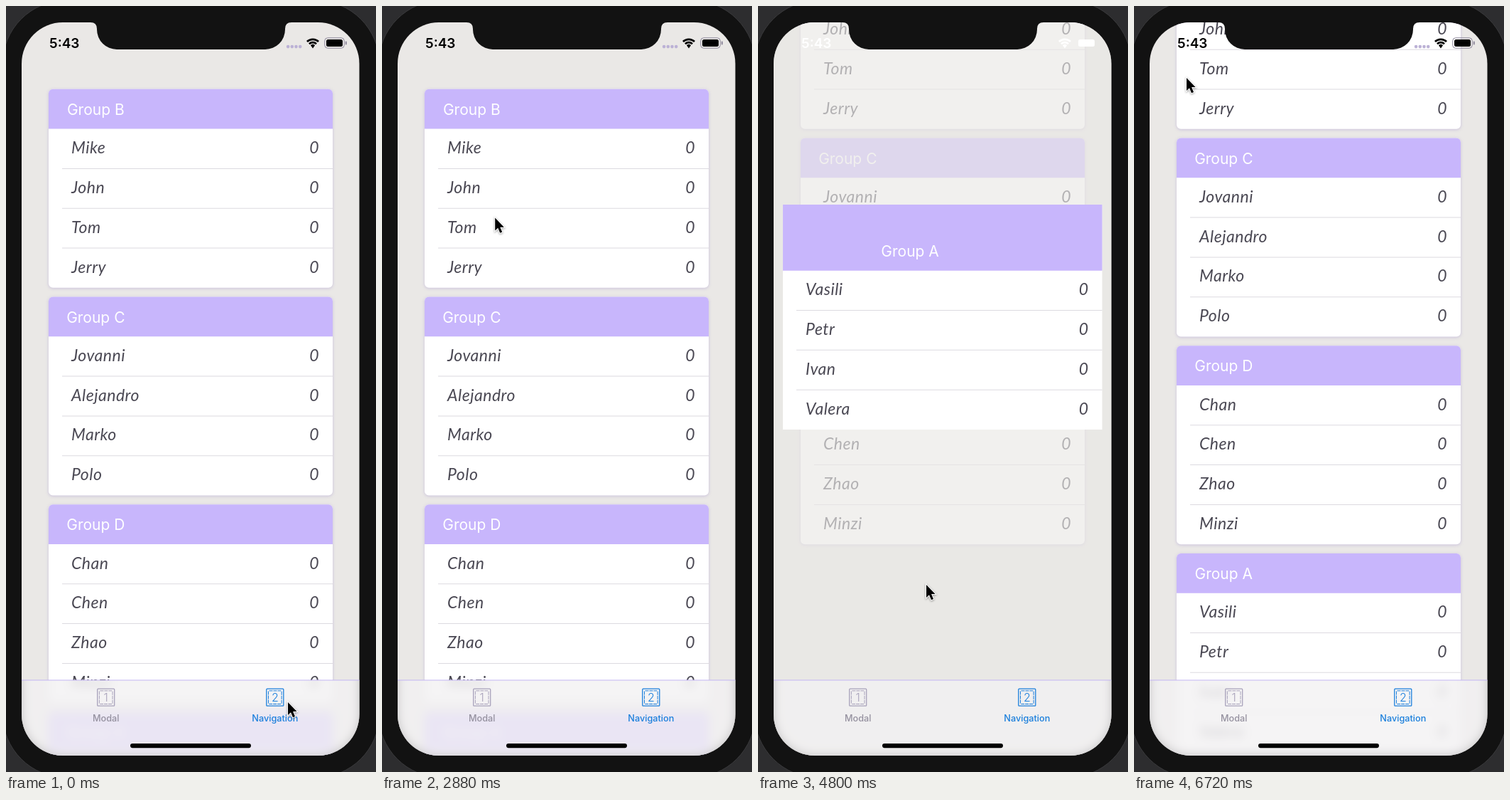
Recreate the animation shown at these times as an HTML page with a canvas. Size 521x1076 px, loop 6.78 s.

```html
<!DOCTYPE html>
<html lang="en">
<head>
<meta charset="utf-8">
<title>Group list</title>
<style>
  html, body { margin: 0; width: 100%; height: 100%; overflow: hidden; background: #121212; }
  canvas { display: block; width: 521px; height: 1076px; }
</style>
</head>
<body>
<canvas id="stage" width="521" height="1076"></canvas>
<script>
const ctx = document.getElementById('stage').getContext('2d');
const LOOP = 6780, STEP = 60, MORPH = 396;
const PURPLE = '#c8b6fc', PAPER = '#eae8e6', INK = '#4a4853';
const ROW = 55.8, PITCH = 291.7, TOP = 116.8;
const UI = 'Inter, sans-serif', HAND = 'italic 23px Lato, sans-serif';

const groups = [
  ['Group B', 'Mike', 'John', 'Tom', 'Jerry'],
  ['Group C', 'Jovanni', 'Alejandro', 'Marko', 'Polo'],
  ['Group D', 'Chan', 'Chen', 'Zhao', 'Minzi'],
  ['Group A', 'Vasili', 'Petr', 'Ivan', 'Valera']
];

// Each visit opens one group and closes it again.
const visits = [
  { group: 1, open: 1380, close: 2480 },
  { group: 3, open: 4560, close: 5980 }
];

// Pointer stops: time, x, y
const stops = [
  [0, 397, 978], [240, 397, 978], [1200, 258, 560], [1740, 258, 560],
  [2348, 103, 103], [2640, 103, 103], [3285, 283, 726], [3600, 278, 606],
  [3700, 278, 606], [4440, 237, 813], [5020, 237, 813], [5620, 81, 101],
  [6200, 74, 101], [LOOP, 74, 101]
];

const lerp = (a, b, p) => a + (b - a) * p;
function ease(t, from, to) {
  const x = Math.min(1, Math.max(0, (t - from) / (to - from)));
  return x * x * (3 - 2 * x);
}

function box(x, y, w, h, r, color) {
  ctx.beginPath();
  ctx.roundRect(x, y, w, h, r);
  if (color) {
    ctx.fillStyle = color;
    ctx.fill();
  }
}

function label(str, x, y, font, color, align = 'left', spacing = 0) {
  ctx.font = font;
  ctx.fillStyle = color;
  ctx.textAlign = align;
  ctx.letterSpacing = spacing + 'px';
  ctx.fillText(str, x, y);
}

// p = 0: card in the list, p = 1: full detail page
function card([title, ...names], y, p) {
  const x = lerp(60, 22, p), w = lerp(400, 475.5, p);
  const top = lerp(y, 23, p), head = lerp(ROW, 112, p);
  const r = p ? 0 : 6;
  ctx.save();
  if (!p) {
    ctx.shadowColor = 'rgba(140,120,200,.35)';
    ctx.shadowBlur = 4;
    ctx.shadowOffsetY = 1;
  }
  box(x, top, w, head + ROW * names.length, r, '#fff');
  ctx.restore();
  box(x, top, w, head, [r, r, 0, 0], PURPLE);
  label(title, lerp(126.3, 260, p), top + lerp(36, 91.5, p),
    (p === 1 ? 500 : 400) + ' 21px ' + UI, '#fff', 'center');
  names.forEach((name, i) => {
    const rowY = top + head + i * ROW;
    if (i) box(x + 19, rowY - 0.5, w - 19, 1, 0, '#dcdae0');
    label(name, x + 32, rowY + 34.5, HAND, INK, 'left', 0.5);
    label('0', x + w - 19.5, rowY + 34.5, HAND, INK, 'right');
  });
}

function backButton() {
  ctx.strokeStyle = '#fff';
  ctx.lineWidth = 3.5;
  ctx.lineCap = ctx.lineJoin = 'round';
  ctx.beginPath();
  ctx.moveTo(47, 95.5);
  ctx.lineTo(36, 107);
  ctx.lineTo(47, 118.5);
  ctx.stroke();
  label('Back', 54.5, 114.5, '400 20.5px ' + UI, '#fff');
}

function statusBar(light) {
  const color = light ? '#fff' : '#000';
  label('5:43', 61, 59, '600 19px ' + UI, color);
  ctx.strokeStyle = color;
  ctx.lineCap = 'butt';
  ctx.lineWidth = 2.7;
  for (const r of [11.7, 7.3]) {
    ctx.beginPath();
    ctx.arc(432, 58.5, r, -Math.PI / 2 - 0.76, -Math.PI / 2 + 0.76);
    ctx.stroke();
  }
  ctx.fillStyle = color;
  ctx.beginPath();
  ctx.moveTo(432, 59.5);
  ctx.arc(432, 58.5, 4.4, -Math.PI / 2 - 0.76, -Math.PI / 2 + 0.76);
  ctx.fill();
  box(451, 47, 23, 10, 2.5, color);
  if (light) return;
  box(448.8, 44.8, 27.4, 14.4, 4);
  ctx.strokeStyle = '#8e889c';
  ctx.lineWidth = 1;
  ctx.stroke();
  box(477.8, 49.5, 2, 5, 1, '#8e889c');
  for (let i = 0; i < 4; i++) box(394.8 + i * 5.7, 54.8, 4.6, 4.6, 2.3, '#bcb2d6');
}

function tab(x, digit, name, color, textColor) {
  ctx.strokeStyle = color;
  ctx.lineWidth = 1.3;
  box(x - 12, 959.2, 24, 24, 1);
  ctx.stroke();
  ctx.lineWidth = 1;
  ctx.setLineDash([5, 1]);
  box(x - 9.3, 961.9, 18.6, 18.6, 1);
  ctx.stroke();
  ctx.setLineDash([]);
  label(digit, x, 977, '300 16px ' + UI, color, 'center');
  label(name, x, 1005, '500 12.7px ' + UI, textColor, 'center');
}

function tabBar() {
  ctx.save();
  ctx.beginPath();
  ctx.rect(22, 947, 476, 106);
  ctx.clip();
  ctx.filter = 'blur(7px)';
  ctx.drawImage(ctx.canvas, 0, 0);
  ctx.filter = 'none';
  box(22, 947, 476, 106, 0, 'rgba(243,242,243,.8)');
  ctx.restore();
  box(22, 946.5, 476, 1, 0, '#c3b6f4');
  tab(140.7, '1', 'Modal', '#a8a2bb', '#95919f');
  tab(378.8, '2', 'Navigation', '#1b7fdc', '#1b7fdc');
  box(175, 1036, 170, 6.2, 3.1, '#000');
}

function notch() {
  ctx.fillStyle = '#121212';
  ctx.beginPath();
  ctx.moveTo(119, 22);
  ctx.lineTo(119, 23);
  ctx.quadraticCurveTo(128, 23, 128, 32);
  ctx.arcTo(128, 61, 160, 61, 28);
  ctx.arcTo(393, 61, 393, 30, 28);
  ctx.lineTo(393, 32);
  ctx.quadraticCurveTo(393, 23, 402, 23);
  ctx.lineTo(402, 22);
  ctx.fill();
}

function pointer(t) {
  const i = stops.findIndex(s => s[0] > t);
  const [t0, x0, y0] = stops[i - 1], [t1, x1, y1] = stops[i];
  const p = ease(t, t0, t1);
  ctx.save();
  ctx.translate(lerp(x0, x1, p), lerp(y0, y1, p));
  ctx.shadowColor = 'rgba(0,0,0,.4)';
  ctx.shadowBlur = 3;
  ctx.shadowOffsetY = 1;
  ctx.lineJoin = 'miter';
  ctx.lineWidth = 2;
  ctx.strokeStyle = '#fff';
  ctx.fillStyle = '#000';
  const arrow = new Path2D('M0 0V18L4 14.2 7 21.2 10 20 7.1 13.1H12.6Z');
  ctx.stroke(arrow);
  ctx.shadowColor = 'transparent';
  ctx.fill(arrow);
  ctx.restore();
}

function draw(t) {
  const scroll = 223 * ease(t, 3285, 3885);
  const visit = visits.find(v => t > v.open && t < v.close + MORPH);
  const p = visit
    ? ease(t, visit.open, visit.open + MORPH) - ease(t, visit.close, visit.close + MORPH)
    : 0;

  box(0, 0, 521, 1076, 0, '#2d2d2f');
  box(-5, -8, 531, 1092, 90, '#121212');
  ctx.strokeStyle = '#3a3a3c';
  ctx.lineWidth = 1;
  ctx.stroke();

  ctx.save();
  box(22, 23, 475.5, 1030, 58, PAPER);
  ctx.clip();
  if (p < 1) {
    groups.forEach((group, i) => {
      if (!visit || visit.group !== i) card(group, TOP + i * PITCH - scroll, 0);
    });
    // Fade the whole list towards the background.
    ctx.globalAlpha = p;
    box(22, 23, 476, 1030, 0, PAPER);
    ctx.globalAlpha = 1;
  }
  if (visit) card(groups[visit.group], TOP + visit.group * PITCH - scroll, p);
  if (p === 1) backButton();
  tabBar();
  statusBar(visit && t < visit.close + MORPH / 2);
  ctx.restore();

  notch();
  pointer(t);
}

const start = performance.now();
function tick() {
  const t = Math.max(0, performance.now() - start) % LOOP;
  draw(Math.floor(t / STEP) * STEP);
  requestAnimationFrame(tick);
}
tick();
</script>
</body>
</html>
```
